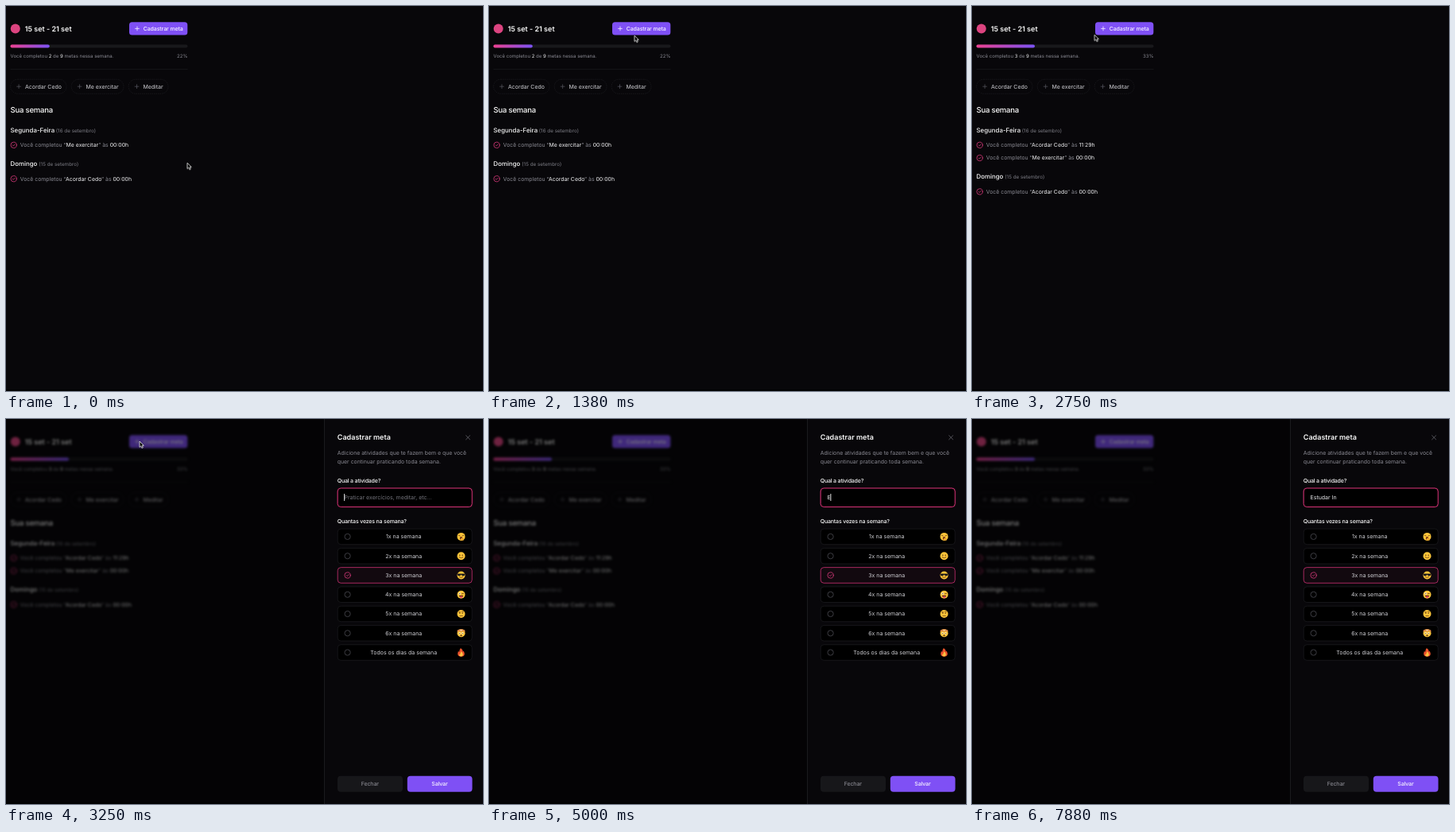
Recreate the animation shown at these times as an HTML page. Size 600 by 484 pixels, loop 8 s.

```html
<!DOCTYPE html>
<html lang="pt-BR">
<head>
<meta charset="utf-8">
<title>Metas da semana</title>
<style>
  html, body { margin: 0; width: 100%; height: 100%; overflow: hidden; background: #08070a; }
  svg { display: block; width: 600px; height: 484px; }
  text { font: 400 7px Inter, "Liberation Sans", sans-serif; fill: #d0d0d5; white-space: pre; text-rendering: geometricPrecision; }
  .xs { font-size: 6.05px; fill: #8a8a93; }
  .muted { font-size: 6.9px; fill: #8a8a93; }
  .date { font-size: 6.3px; fill: #7e7e86; }
  .hi { fill: #f1f1f3; }
  .day { font-size: 7.9px; font-weight: 500; fill: #f4f4f5; }
  .title { font-size: 9px; font-weight: 600; fill: #fafafa; }
  .heading { font-size: 9.6px; font-weight: 500; fill: #fafafa; letter-spacing: -.025em; }
  .label { font-weight: 500; fill: #fafafa; letter-spacing: -.025em; }
  .btn { font-weight: 500; letter-spacing: -.015em; fill: #f8f6ff; }
  .mid { text-anchor: middle; }
  .end { text-anchor: end; }
  .line { fill: none; stroke-linecap: round; stroke-linejoin: round; }
  .pink { stroke: #d93a7c; }

  .before, .after, #sheet, #page, #shift, #fill, #pointer { animation: 8s linear infinite; }
  .before, .after, #sheet, #page, #shift, #fill { animation-timing-function: step-end; }
  .before { animation-name: leave; }
  .after { animation-name: arrive; }
  #sheet { animation-name: open; }
  #page { animation-name: blur; }
  #shift { animation-name: shift; }
  #fill { animation-name: fill; }
  #pointer { animation-name: point; }
  @keyframes leave { 0% { visibility: visible } 28.1%, 100% { visibility: hidden } }
  @keyframes arrive { 0% { visibility: hidden } 28.1%, 100% { visibility: visible } }
  @keyframes open { 0% { visibility: hidden } 37.5%, 100% { visibility: visible } }
  @keyframes blur { 0% { filter: none } 37.5%, 100% { filter: blur(1.4px) } }
  @keyframes shift { 0% { transform: none } 28.1%, 100% { transform: translateY(16.2px) } }
  @keyframes fill { 0% { width: 49.3px } 28.1%, 100% { width: 73.5px } }
  @keyframes point {
    0% { transform: translate(228px, 197.2px) }
    1.6% { transform: translate(228px, 197.2px); animation-timing-function: ease-in-out }
    11.5% { transform: translate(190px, 27px) }
    15.6% { transform: translate(189px, 31px) }
    17.2% { transform: translate(183px, 37.2px); animation-timing-function: ease-in-out }
    21.9% { transform: translate(61px, 105.5px) }
    23.5%, 28.1% { transform: translate(54.3px, 104.2px); animation-timing-function: ease-in-out }
    34.4% { transform: translate(154.1px, 36.2px) }
    37.5% { transform: translate(167px, 29.2px) }
    40.6% { transform: translate(168px, 28px) }
    46.9%, 62.49% { transform: translate(173px, 31.5px); visibility: visible }
    62.5%, 100% { transform: translate(173px, 31.5px); visibility: hidden }
  }
</style>
</head>
<body>
<svg viewBox="0 0 600 484">
  <defs>
    <linearGradient id="grad"><stop stop-color="#ec4190"/><stop offset="1" stop-color="#7a52f5"/></linearGradient>
    <path id="plus" class="line" d="M-2.4 0H2.4M0-2.4V2.4"/>
    <g id="check" class="line pink" stroke-width=".8">
      <circle r="3.7"/><path d="M-1.4 .1l1 1 1.9-2"/>
    </g>
    <circle id="face" r="5" fill="#fbc43a"/>
    <g id="dots" fill="#5a3210"><circle cx="-1.7" cy="-1" r=".75"/><circle cx="1.7" cy="-1" r=".75"/></g>
    <g id="e0">
      <use href="#face"/>
      <path class="line" stroke="#5a3210" stroke-width=".7" d="M-3.2-1.6l1.8.6M3.2-1.6l-1.8.6"/>
      <ellipse cy="2" rx="1.7" ry="1.9" fill="#6b2a16"/>
      <path d="M-.5 4.8Q-1.5 2 .8 1.6L3.6 2.4 3.2 4.6Z" fill="#eda52c"/>
    </g>
    <g id="e1">
      <use href="#face"/><use href="#dots"/>
      <path class="line" stroke="#5a3210" stroke-width=".8" d="M-2.4 1.6Q0 3.8 2.4 1.6"/>
    </g>
    <g id="e2">
      <use href="#face"/>
      <path d="M-4.8-1.9H4.8L4.2.2Q2.5 1.7.8 0L0-.8-.8 0Q-2.5 1.7-4.2.2Z" fill="#16161c"/>
      <path class="line" stroke="#5a3210" stroke-width=".8" d="M-2 2.4Q0 3.7 2 2.2"/>
    </g>
    <g id="e3">
      <use href="#face"/>
      <circle cx="-1.8" cy="-1.2" r="1.3" fill="#fff"/><circle cx="-1.7" cy="-1.1" r=".7" fill="#5a3210"/>
      <path class="line" stroke="#5a3210" stroke-width=".8" d="M1-1l2-.5"/>
      <path d="M-2.8 1H2.8Q2.2 3.6 0 3.6T-2.8 1Z" fill="#6b2a16"/>
      <path d="M-1.2 2.2H1.4V3.8Q.1 5.4-1.2 3.8Z" fill="#ee4b6a"/>
    </g>
    <g id="e4">
      <use href="#face"/><use href="#dots"/>
      <path class="line" stroke="#5a3210" stroke-width=".7" d="M-3-2.2h2M.8-3Q2-3.8 3.2-2.7M-1.6 2.5H1.8"/>
    </g>
    <g id="e5">
      <use href="#face"/>
      <path d="M-4.8-1.4Q-5.6-4.2-2.8-4.5 0-6.2 2.8-4.5 5.6-4.2 4.8-1.4L2.6-2.4 0-1.8-2.6-2.4Z" fill="#d98345"/>
      <path d="M-2.3-3.6Q0-5 2.3-3.6L0-2.7Z" fill="#fbe0a0"/>
      <g fill="#fff"><circle cx="-1.8" cy=".2" r="1.1"/><circle cx="1.8" cy=".2" r="1.1"/></g>
      <g fill="#5a3210"><circle cx="-1.8" cy=".2" r=".55"/><circle cx="1.8" cy=".2" r=".55"/><ellipse cy="3" rx="1.1" ry="1"/></g>
    </g>
    <g id="e6">
      <path d="M-.6-5.4Q2.4-3.4 2.4-.8L3.3-2Q6.2 5 0 5.2-6 5-3.6-1.8L-2.4-.4Q-2.2-3.6-.6-5.4Z" fill="#f0542d"/>
      <path d="M.1-1.2Q2.6 1 2.4 3 1.6 5 0 5-2.6 4.8-2.4 2.4L-1.3 2.6Q-1 .6.1-1.2Z" fill="#fcc341"/>
    </g>
  </defs>

  <rect width="600" height="484" fill="#08070a"/>
  <rect y="482" width="600" height="2" fill="#020203"/>

  <g id="page">
    <circle cx="11.8" cy="28.4" r="6" fill="#dc4480"/>
    <text class="title" x="23.7" y="31.5">15 set - 21 set</text>
    <rect x="155" y="20.3" width="73.3" height="16.3" rx="3.6" fill="#7f50f5"/>
    <use href="#plus" x="165" y="28.4" stroke="#f5f3ff" stroke-width=".8"/>
    <text class="btn" x="172.7" y="31">Cadastrar meta</text>

    <rect x="5.5" y="48.5" width="223" height="4" rx="2" fill="#18181b"/>
    <rect id="fill" x="5.5" y="48.5" width="49.3" height="4" rx="2" fill="url(#grad)"/>
    <g class="before">
      <text class="xs" x="5.6" y="65">Você completou <tspan class="hi">2</tspan> de <tspan class="hi">9</tspan> metas nessa semana.</text>
      <text class="xs end" x="228.4" y="65">22%</text>
    </g>
    <g class="after">
      <text class="xs" x="5.6" y="65">Você completou <tspan class="hi">3</tspan> de <tspan class="hi">9</tspan> metas nessa semana.</text>
      <text class="xs end" x="228.4" y="65">33%</text>
    </g>
    <path d="M5.5 79.5H228.5" stroke="#18181b" stroke-width=".8"/>
    <g id="pills"></g>

    <text class="heading" x="5.5" y="133.8">Sua semana</text>
    <text class="day" x="5.5" y="158.6">Segunda-Feira</text>
    <text class="date" x="62.8" y="158.6">(16 de setembro)</text>
    <g class="after">
      <use href="#check" x="9.7" y="174.8"/>
      <text class="muted" x="17.8" y="177.3">Você completou “<tspan class="hi">Acordar Cedo</tspan>” às <tspan class="hi">11:29h</tspan></text>
    </g>
    <g id="shift">
      <use href="#check" x="9.7" y="174.8"/>
      <text class="muted" x="17.8" y="177.3">Você completou “<tspan class="hi">Me exercitar</tspan>” às <tspan class="hi">00:00h</tspan></text>
      <text class="day" x="5.5" y="201">Domingo</text>
      <text class="date" x="41.3" y="201">(15 de setembro)</text>
      <use href="#check" x="9.7" y="217.2"/>
      <text class="muted" x="17.8" y="219.7">Você completou “<tspan class="hi">Acordar Cedo</tspan>” às <tspan class="hi">00:00h</tspan></text>
    </g>
  </g>

  <g id="sheet">
    <rect width="600" height="484" opacity=".5"/>
    <rect x="400" width="200" height="484" fill="#08070a"/>
    <path d="M400.5 0V484" stroke="#1a1a1d"/>
    <text class="title" x="416.8" y="26.4">Cadastrar meta</text>
    <path class="line" d="M578.6 20.8l5 5m0-5l-5 5" stroke="#66666e" stroke-width=".8"/>
    <text class="muted" x="416.8" y="44.6">Adicione atividades que te fazem bem e que você</text>
    <text class="muted" x="416.8" y="56.2">quer continuar praticando toda semana.</text>

    <text class="label" x="416.8" y="79.7">Qual a atividade?</text>
    <rect x="416" y="86" width="171.5" height="25.5" rx="5" fill="#d93a7c" opacity=".15"/>
    <rect x="417.2" y="87" width="169" height="23.5" rx="4" fill="#000" stroke="#cf3071"/>
    <text id="hint" x="425.5" y="101.4" style="fill:#74747c">Praticar exercícios, meditar, etc...</text>
    <text id="typed" x="425.5" y="101.4" style="fill:#ececef"></text>
    <rect id="caret" y="94" width=".9" height="9" fill="#f4f4f5"/>

    <text class="label" x="416.8" y="131">Quantas vezes na semana?</text>
    <g id="options"></g>

    <rect x="417" y="448.7" width="82" height="20" rx="4" fill="#17171a"/>
    <text class="btn mid" x="457.8" y="461.2" style="fill:#85858d">Fechar</text>
    <rect x="504.8" y="448.7" width="81.7" height="20" rx="4" fill="#7f50f5"/>
    <text class="btn mid" x="545.4" y="461.2">Salvar</text>
  </g>

  <g id="pointer">
    <path d="M0 0V7.4L1.7 5.9 2.9 8.5 4.3 7.9 3.1 5.3H5.3Z" fill="#050505" stroke="#f2f2f2" stroke-width=".8" stroke-linejoin="round"/>
  </g>
</svg>
<script>
  const $ = id => document.getElementById(id);

  const pills = [[5.7, 70.3, 'Acordar Cedo'], [82.2, 65.8, 'Me exercitar'], [154.1, 49.9, 'Meditar']];
  $('pills').innerHTML = pills.map(([x, w, name]) => `
    <rect x="${x}" y="92.2" width="${w}" height="18" rx="9" fill="none" stroke="#222226" stroke-width=".7" stroke-dasharray="1.5 1"/>
    <use href="#plus" x="${x + 10.4}" y="101.2" stroke="#5a5a62" stroke-width=".7"/>
    <text x="${x + 18.3}" y="103.7">${name}</text>`).join('');

  const picked = 2;
  $('options').innerHTML = [1, 2, 3, 4, 5, 6, 7].map((n, i) => {
    const y = 147.9 + i * 24.27, on = i === picked;
    const mark = on ? `<use href="#check" x="429.6" y="${y}"/>`
      : `<circle cx="429.6" cy="${y}" r="3.6" fill="none" stroke="#55555d" stroke-width=".7"/>`;
    return `<rect x="417.2" y="${y - 9.8}" width="169" height="19.6" rx="4"
        fill="${on ? '#12090f' : '#000'}" stroke="${on ? '#b92c68' : '#18181b'}" stroke-width=".9"/>
      ${mark}
      <text class="mid" x="500.2" y="${y + 2.5}">${n < 7 ? n + 'x na semana' : 'Todos os dias da semana'}</text>
      <use href="#e${i}" x="572.5" y="${y}"/>`;
  }).join('');

  const word = 'Estudar In';
  const keys = [5000, 5130, 5250, 5500, 5630, 5880, 6000, 7130, 7250, 7380];
  const opened = 3000, loop = 8000;
  let start;

  function draw(now) {
    start ??= now;
    const t = (now - start) % loop;
    const count = keys.filter(k => k <= t).length;
    const last = count ? keys[count - 1] : opened;
    const typed = $('typed');
    typed.textContent = word.slice(0, count);
    $('hint').style.display = count ? 'none' : '';
    $('caret').setAttribute('x', 425.2 + (count ? typed.getComputedTextLength() : 0));
    // The caret blinks in half seconds, restarting at each key
    $('caret').style.opacity = Math.floor((t - last) / 500) % 2 ? 0 : 1;
    requestAnimationFrame(draw);
  }
  requestAnimationFrame(draw);
</script>
</body>
</html>
```
